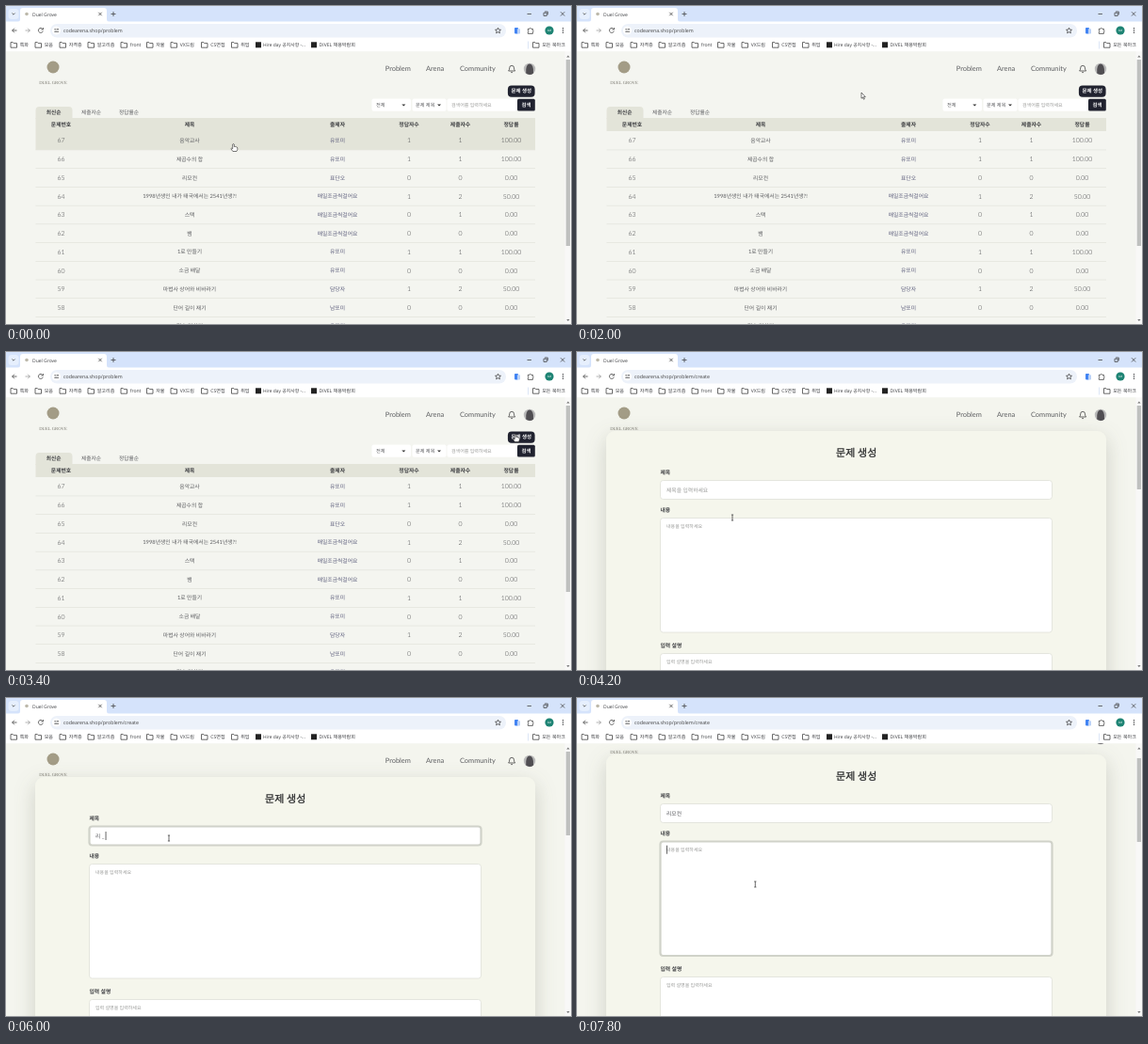
Recreate the animation shown at these times as an HTML page. Size 600 by 338 pixels, loop 8000 ms.

```html
<!DOCTYPE html>
<html lang="ko">
<head>
<meta charset="utf-8">
<title>Duel Grove</title>
<style>
html, body { margin: 0; width: 100%; height: 100%; overflow: hidden; }
svg { display: block; width: 100%; height: 100%; text-rendering: geometricPrecision; }
.page { font-family: Lato, "Noto Sans CJK KR", sans-serif; }
.ui { font-family: "Open Sans", "Noto Sans CJK KR", sans-serif; }
.mid { text-anchor: middle; }
.bold { font-weight: 700; }
.thin { font-weight: 300; }
.head { stroke: #28292b; stroke-width: .25; }
.logo { font-family: "Liberation Serif", serif; }
.line { fill: none; stroke: #444; stroke-width: .8; }
.card { filter: drop-shadow(0 7px 11px rgba(60, 65, 40, .2)); }
</style>
</head>
<body>
<svg id="stage" viewBox="0 0 600 338" preserveAspectRatio="none"></svg>
<script>
const LOOP = 8000, STEP = 200, OPEN = 3800, ROW = 19.72, TOP = 133;
const INK = '#3c3d40', SOFT = '#5c5d60', LINK = '#5d5e7c', DARK = '#20222f', BAND = '#e3e4d9', HINT = '#999a98';

const text = (x, y, s, size, fill = INK, cls = '') =>
  `<text x="${x}" y="${y + size * .36}" font-size="${size}" fill="${fill}" class="${cls}">${s}</text>`;
const rect = (x, y, w, h, fill, r = 0, more = '') =>
  `<rect x="${x}" y="${y}" width="${w}" height="${h}" fill="${fill}" rx="${r}" ${more}/>`;
const dot = (x, y, r, fill) => `<circle cx="${x}" cy="${y}" r="${r}" fill="${fill}"/>`;
const line = (d, more = '') => `<path class="line" d="${d}" ${more}/>`;
const shape = (d, fill) => `<path d="${d}" fill="${fill}"/>`;

// Browser frame
const folder = x => line(`M${x} 38.6h2.4l.8 1h3.3v4.6h-6.5z`, 'stroke-width=".7"');
const marks = [[5, '특화'], [31, '모음'], [57, '자격증'], [87, '알고리즘'], [122, 'front'], [149.5, '자율'],
  [175, 'VX드림'], [207.5, 'CS면접'], [239.5, '취업'], [559.5, '모든 북마크']];

function browser() {
  return `<g class="ui">` +
    rect(0, 0, 600, 20, '#d5e3fb') + rect(0, 16.5, 600, 31.7, '#fff') +
    shape('M12 17q3 0 3-3V5q0-3 3-3h86q3 0 3 3v9q0 3 3 3z', '#fff') +
    rect(2.5, 3, 11, 11, '#e6effd', 3.5) + line('M6.4 7.6l1.6 1.6 1.6-1.6') +
    dot(22, 8.5, 1.8, '#bcb8aa') + text(28, 8.7, 'Duel Grove', 5) +
    line('M98.3 6.8l3.4 3.4m0-3.4l-3.4 3.4M114 6v5m-2.5-2.5h5') +
    line('M553.5 8.5h4.4M571 7.2h3.2v3.2H571zM572 6h3.3v3.3M589 6.3l4.2 4.2m0-4.2l-4.2 4.2', 'stroke-width=".6"') +
    line('M11.5 26H6.6m2.3-2.3L6.6 26l2.3 2.3') +
    line('M20.5 26h4.9m-2.3-2.3l2.3 2.3-2.3 2.3', 'opacity=".5"') +
    line('M39 24.6a2.5 2.5 0 1 0 .3 2M39.4 23v2h-2') +
    rect(47, 19, 484, 14.5, '#edf2fa', 7.2) + dot(53.5, 26, 4.6, '#fff') +
    line('M51.3 24.8h2.2M51.3 27.3h.8M54 27.3h2') + dot(55, 24.8, .8, INK) + dot(53, 27.3, .8, INK) +
    `<text id="url" x="61" y="28" font-size="5.3" fill="#444"></text>` +
    line('M522.5 23.2l.9 1.9 2.1.2-1.6 1.4.5 2.1-1.9-1.1-1.9 1.1.5-2.1-1.6-1.4 2.1-.2z', 'stroke-width=".7"') +
    rect(540, 23, 4, 6.4, '#4284f3', .8) + rect(543, 24.2, 3, 5.2, '#bdd3f7', .6) +
    line('M554.3 24.3h1.7q.8-2 1.6 0h1.8v1.8q1.8.7 0 1.5v1.8h-5.1v-1.7q1.5-.8 0-1.6z') +
    dot(577, 26, 4.6, '#1d8373') + text(577, 26, 'AM', 3, '#fff', 'mid') +
    [23.7, 26, 28.3].map(y => dot(591.5, y, .7, INK)).join('') +
    marks.map(([x, s]) => folder(x) + text(x + 9.7, 41.3, s, 5.1)).join('') +
    rect(265, 38.3, 6, 6, '#222') + text(273, 41.3, 'Hire day 공지사항 -...', 4.9) +
    rect(324, 38.3, 6, 6, '#222') + text(332.5, 41.3, 'DIVEL 채용박람회', 5.1) +
    rect(554, 37.5, .6, 8, '#c5d6f0') + `</g>`;
}

// Site header, shared by both pages
function header() {
  return dot(50, 65, 6.5, '#a39c86') + text(50, 81, 'DUEL GROVE', 4.7, '#77756c', 'logo mid') +
    text(402.8, 66.3, 'Problem', 7.4, SOFT) + text(446, 66.3, 'Arena', 7.4, SOFT) + text(482, 66.3, 'Community', 7.4, SOFT) +
    line('M533.6 69h7q-1.1-1-1.1-3.2 0-2.5-2.4-2.5t-2.4 2.5q0 2.2-1.1 3.2zM536.2 70.6h1.8') +
    dot(556, 67, 6.2, '#b9b9b9') +
    shape('M552.2 71.6q-.6-10 3.8-10.2 4.6.2 4 10.1-3.9 3-7.8.1z', '#504e52');
}

// Problem list
const A = '유또미', B = '매일조금씩걸어요';
const rows = [
  ['음악교사', A, 1, 1], ['제곱수의 합', A, 1, 1], ['리모컨', '표단오', 0, 0],
  ['1998년생인 내가 태국에서는 2541년생?!', B, 1, 2], ['스택', B, 0, 1], ['뱀', B, 0, 0],
  ['1로 만들기', A, 1, 1], ['소금 배달', A, 0, 0], ['마법사 상어와 비바라기', '담당자', 1, 2],
  ['단어 길이 재기', '남또미', 0, 0], ['정수 더하기', A, 0, 0]];
const cols = [58.5, 195, 352, 428, 482.5, 536.5];
const heads = ['문제번호', '제목', '출제자', '정답자수', '제출자수', '정답률'];

function listPage() {
  const cell = (v, c, y) => c == 1 || c == 2
    ? text(cols[c], y, v, 5.8, c == 2 ? LINK : SOFT, 'mid')
    : text(cols[c], y, v, 6.9, INK, 'mid thin');
  const tableRow = ([name, by, ok, all], i) => {
    const y = TOP + 10 + i * ROW, rate = (all ? ok / all * 100 : 0).toFixed(2);
    return [67 - i, name, by, ok, all, rate].map((v, c) => cell(v, c, y)).join('') +
      rect(31.5, TOP + (i + 1) * ROW, 530.5, .5, '#d9dad1');
  };
  const arrow = x => shape(`M${x} 104.4h4l-2 2.2z`, '#333');
  return rect(0, 48, 600, 290, '#f4f5f0') + header() +
    rect(532.9, 84.6, 28.7, 12.2, DARK, 4) + text(547.3, 90.3, '문제 생성', 5.5, '#fff', 'mid bold') +
    rect(388.5, 98.5, 41.5, 13.3, '#fff', 2) + text(393, 105.3, '전체', 5.2, SOFT) + arrow(420.3) +
    rect(431.5, 98.5, 36, 13.3, '#fff', 2) + text(435, 105.3, '문제 제목', 5.2, SOFT) + arrow(458) +
    rect(468.5, 98.5, 74, 13.3, '#fff', 2) + text(473, 105.3, '검색어를 입력하세요', 5, HINT) +
    rect(543, 98.7, 18.8, 12.9, DARK, 1.5) + text(552.5, 105.2, '검색', 5.4, '#fff', 'mid bold') +
    shape('M31.5 120v-9q0-4 4-4h31q4 0 4 4v9z', BAND) +
    text(50.7, 113.3, '최신순', 5.7, INK, 'mid bold') +
    text(80, 113.3, '제출자순', 5.7, SOFT) + text(120, 113.3, '정답률순', 5.7, SOFT) +
    rect(31.5, 119, 530.5, 14, BAND) +
    heads.map((h, i) => text(cols[i], 126, h, 5.8, INK, 'mid bold')).join('') +
    rect(31.5, 0, 530.5, ROW, BAND, 0, 'id="hover"') + rows.map(tableRow).join('');
}

// Create form
const box = (y, h, id) => rect(88.5, y, 416, h, '#fff', 3, `id="${id}"  stroke="#dcddd4" stroke-width=".7"`);

function formPage() {
  return rect(0, 48, 600, 330, '#f4f5ee') + header() +
    rect(31, 84, 531, 700, '#f5f6ec', 9, 'class="card"') +
    text(296.7, 107.3, '문제 생성', 11, '#28292b', 'mid head') +
    text(88.5, 128, '제목', 5.8, INK, 'bold') + box(136.5, 20, 'title') +
    text(88.5, 167.5, '내용', 5.8, INK, 'bold') + box(176.5, 121.5, 'body') + text(95, 185, '내용을 입력하세요', 5, HINT) +
    text(88.5, 312, '입력 설명', 5.8, INK, 'bold') + box(320.5, 121.5, 'input') + text(95, 329, '입력 설명을 입력하세요', 5, HINT) +
    `<text id="typed" x="95" y="148.6" font-size="5.8" xml:space="preserve"></text>` +
    rect(95, 142, .7, 9, '#222', 0, 'id="caret"');
}

const cursors =
  `<g id="arrow"><path d="M0 0V6.2L1.4 5 2.4 7.2 3.4 6.8 2.4 4.6H4.3Z" fill="#fff" stroke="#222" stroke-width=".6"/></g>` +
  `<g id="hand"><path d="M-.8 .5Q0-.5.8.5V3Q1.8 2.6 2.3 3.2 3.3 3 3.5 3.7 4.3 3.6 4.3 4.5V6L3.4 8H-.6L-2.6 5.2Q-2.4 4.2-.8 5.2Z" fill="#fff" stroke="#222" stroke-width=".6"/></g>` +
  `<g id="beam">${line('M-1.1-3H1.1M0-3V3M-1.1 3H1.1', 'stroke-width=".55"')}</g>`;

stage.innerHTML = `<clipPath id="view"><rect y="48" width="600" height="290"/></clipPath>
  <g class="page" clip-path="url(#view)"><g id="list">${listPage()}</g><g id="form">${formPage()}</g></g>` +
  rect(593.5, 48, 6.5, 290, '#f8f8f7') + rect(594.7, 57, 4.3, 89, '#bfc0bf', 0, 'id="thumb"') +
  shape('M595.2 54.4h3.4l-1.7-2zM595.2 333h3.4l-1.7 2z', '#777') + browser() +
  `<g id="pointer">${cursors}</g>`;

const $ = id => document.getElementById(id);
const show = (id, on) => $(id).setAttribute('display', on ? 'inline' : 'none');
const set = (id, o) => { for (const k in o) $(id).setAttribute(k, o[k]); };

// time, x, y of the pointer's hot spot
const path = [[0, 241.5, 146.5], [400, 241.5, 146.5], [800, 262, 206], [1400, 298, 80], [1800, 302, 91],
  [2000, 302, 92], [2200, 385, 184], [2400, 404, 152], [2800, 530, 94], [3000, 540, 89], [3400, 541, 87.5],
  [3800, 541, 88], [4000, 235, 240], [4200, 165, 176], [4600, 172, 150], [4800, 173, 149], [7000, 173, 149],
  [7200, 177, 160], [7400, 184, 182], [7600, 188, 197], [7800, 189.3, 198]];
const scrolls = [[0, 0], [7000, 0], [7200, 6], [7400, 18], [7600, 24]];
const typing = [[0, ''], [5200, 'ㄹ'], [5600, '리'], [5800, '리ㅁ'], [6000, '리 _'], [6200, '리모커'], [6600, '리모컨']];

function at(keys, t) {
  const i = keys.findLastIndex(k => k[0] <= t), a = keys[Math.max(i, 0)], b = keys[i + 1] || a;
  const p = b[0] > a[0] ? (t - a[0]) / (b[0] - a[0]) : 0;
  return a.slice(1).map((v, j) => v + (b[j + 1] - v) * p);
}

function draw(t) {
  const form = t >= OPEN, [x, y] = at(path, t), [scroll] = at(scrolls, t);
  show('list', !form);
  show('form', form);
  $('url').textContent = 'codearena.shop/problem' + (form ? '/create' : '');
  set('form', { transform: `translate(0 ${-scroll})` });
  set('thumb', { y: 57 + scroll * .29, height: form ? 89 : 198 });

  // The row highlight trails the pointer slightly
  const row = Math.floor((at(path, Math.max(t - 150, 0))[1] - TOP) / ROW);
  show('hover', row >= 0);
  set('hover', { y: TOP + row * ROW });

  const inTitle = t >= 4600 && t < 7600, inBody = t >= 7600;
  for (const [id, on] of [['title', inTitle], ['body', inBody]])
    set(id, { stroke: on ? '#d0d2c9' : '#dcddd4', 'stroke-width': on ? 2.2 : .7 });
  const word = typing.findLast(k => k[0] <= t)[1], n = word.replace(' ', '').length;
  $('typed').textContent = word || '제목을 입력하세요';
  set('typed', { fill: word ? '#55565a' : HINT });
  show('caret', inTitle || inBody);
  set('caret', { x: inTitle ? 95 + n * 5.34 : 95, y: inTitle ? 142 : 180.7 });

  const kind = form ? (x < 506 ? 'beam' : 'arrow') : y > TOP || (x > 533 && y < 97) ? 'hand' : 'arrow';
  for (const k of ['arrow', 'hand', 'beam']) show(k, k == kind);
  set('pointer', { transform: `translate(${x} ${y})` });
}

const start = performance.now();
function tick() {
  const t = (performance.now() - start) % LOOP;
  draw(Math.floor(t / STEP) * STEP);
  requestAnimationFrame(tick);
}
tick();
</script>
</body>
</html>
```
